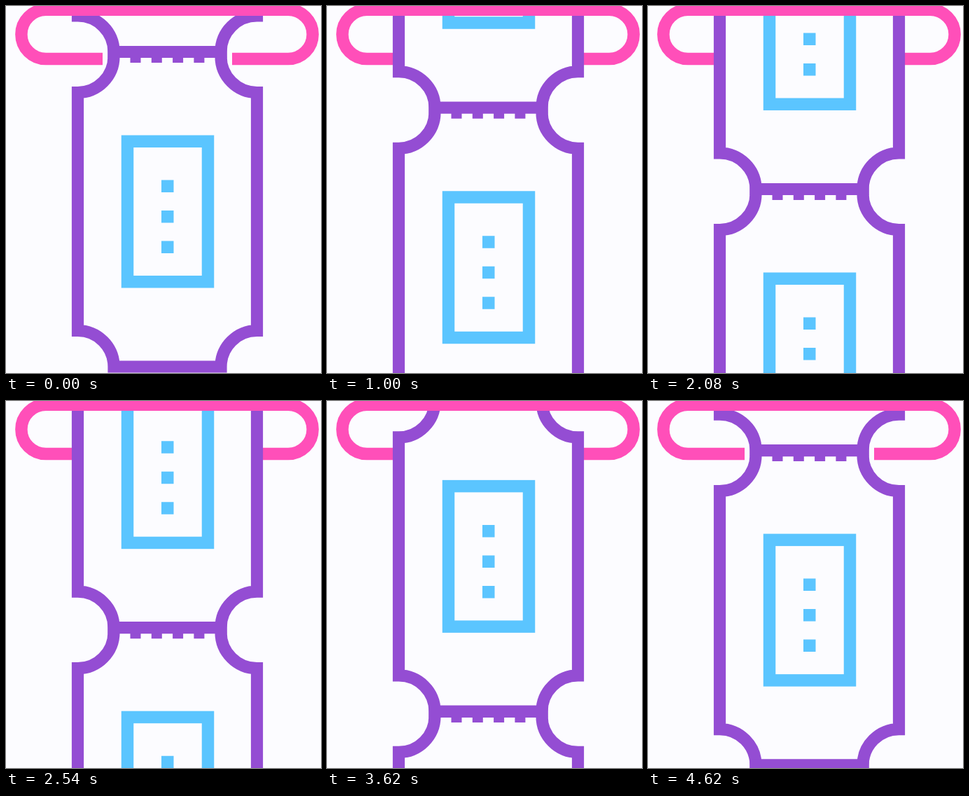
Animation of 450x524 px, one loop 4.72 s. Source, as an HTML page:

```html
<!DOCTYPE html>
<html>
<head>
<meta charset="utf-8">
<style>
  html, body { margin: 0; width: 100%; height: 100%; overflow: hidden; background: #fcfcff; }
  svg { display: block; }
  .edge { stroke: #944dd3; }
  .panel { stroke: #5bc5ff; }
  .slot { stroke: #ff4fb9; }
</style>
</head>
<body>
<svg width="450" height="524" fill="none" stroke-width="17.5">
  <defs>
    <g id="ticket">
      <path class="edge" fill="#fcfcff" stroke-width="17.2" d="M154 8.5V15A51.5 51.5 0 0 1 102.5 66.5V406.5A51.5 51.5 0 0 1 154 458H307A51.5 51.5 0 0 1 358.5 406.5V66.5A51.5 51.5 0 0 1 307 15V8.5Z"/>
      <path class="edge" stroke-width="8" stroke-dasharray="15 15.3" d="M177.5 20H284"/>
      <rect class="panel" x="173.5" y="136.25" width="115" height="200.5"/>
      <path class="panel" stroke-dasharray="17.5 26" d="M230.75 191.5V296"/>
    </g>
  </defs>
  <path class="slot" d="M138 75.5H57A35.1 35.1 0 0 1 57 5.3H403A35.1 35.1 0 0 1 403 75.5H323"/>
  <g id="strip">
    <use href="#ticket" y="-899"/>
    <use href="#ticket" y="-449.5"/>
    <use href="#ticket"/>
  </g>
  <path class="slot" d="M57 5.3H403"/>
</svg>
<script>
const LOOP = 4720, LAST_STEP = 83, TRAVEL = 454.6, START = 57;
const strip = document.getElementById('strip');

// In every twelve ticks four are long; each sixth tick repeats the pose before it
const tickLength = tick => [1, 3, 7, 10].includes(tick % 12) ? 100 : 20;

function stepAt(time) {
  let tick = 0;
  while (time >= tickLength(tick)) time -= tickLength(tick++);
  return tick - Math.floor(tick / 6);
}

// Soft ease-in-out that is still moving at both ends
const ease = u => u + u * (1 - u) * (-0.58 + 1.255 * u - 0.195 * u * u);

function draw() {
  const y = START + TRAVEL * ease(stepAt(performance.now() % LOOP) / LAST_STEP);
  strip.setAttribute('transform', `translate(0 ${y.toFixed(2)})`);
  requestAnimationFrame(draw);
}
draw();
</script>
</body>
</html>
```
